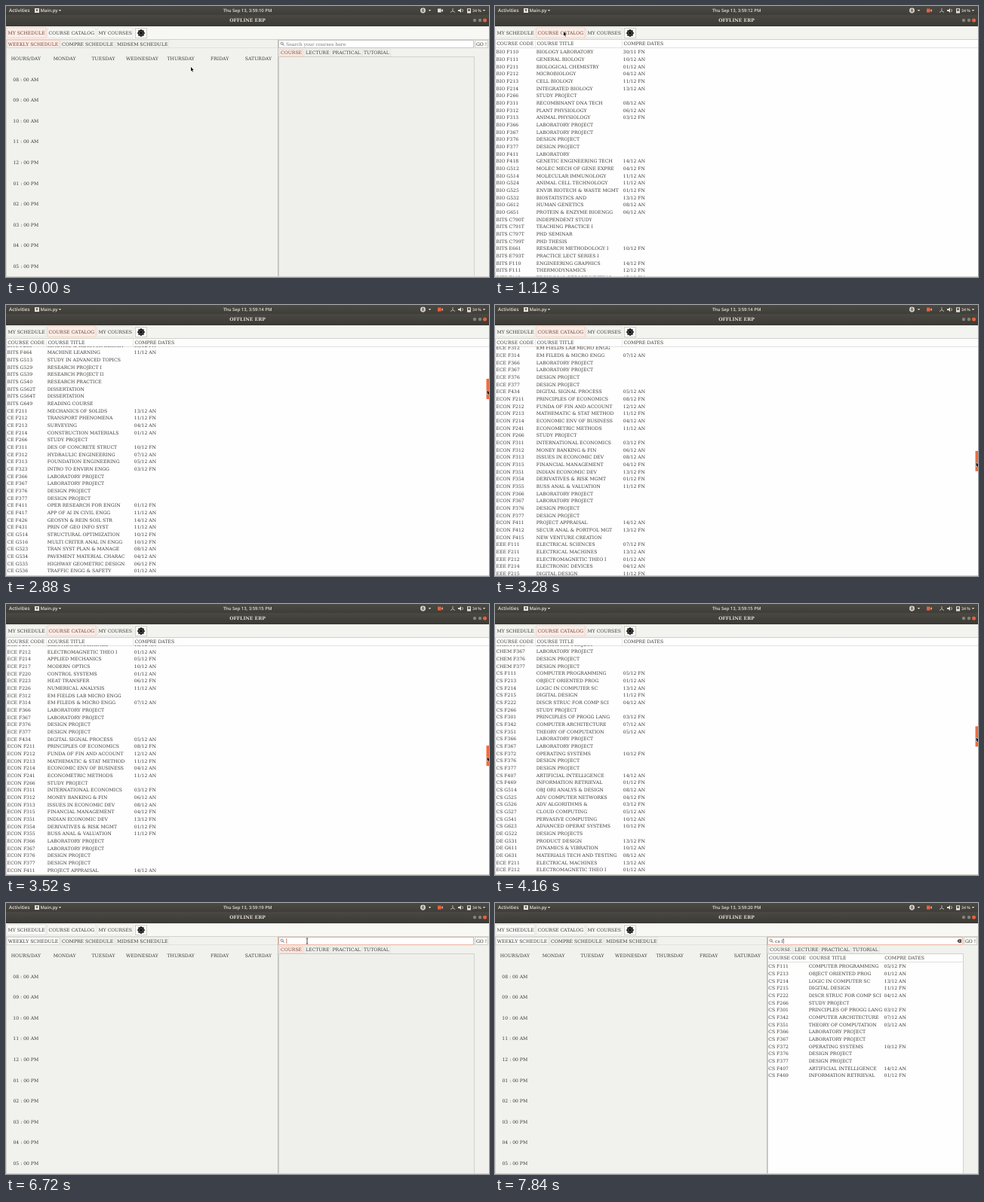
An HTML page with a canvas that plays this animation: 640x360 px, repeating every 8 s.

```html
<!DOCTYPE html>
<html lang="en">
<head>
<meta charset="utf-8">
<title>Offline ERP</title>
<style>
html, body { margin: 0; height: 100%; overflow: hidden; background: #f1f1ed; }
canvas { display: block; width: 100vw; height: 100vh; }
</style>
</head>
<body>
<canvas id="stage" width="640" height="360"></canvas>
<script>
const ctx = document.getElementById('stage').getContext('2d');
ctx.textRendering = 'geometricPrecision';

const LOOP = 8000, STEP = 80, ROW = 29 / 3;
const INK = '#3a3a38', LINE = '#d3d2cc', PAPER = '#f1f1ed', LIGHT = '#f7f7f4', ORANGE = '#ee6c3f';

// Noto Serif runs narrower, so it needs a larger size than DejaVu Serif.
const widthOf = font => { ctx.font = font; return ctx.measureText('Wide iiii').width; };
const hasDejaVu = widthOf('50px "DejaVu Serif", monospace') !== widthOf('50px monospace');
const SIZE = hasDejaVu ? 6.1 : 6.95;
const SERIF = '"DejaVu Serif", "Noto Serif", serif';
const SANS = '"Open Sans", "Noto Sans", sans-serif';

// "NAME:" opens a department, "PROJECTS" adds its four project courses,
// "+count first" adds generated courses.
const CATALOG = `BIO:
F110 BIOLOGY LABORATORY 30/11 FN
F111 GENERAL BIOLOGY 10/12 AN
F211 BIOLOGICAL CHEMISTRY 01/12 AN
F212 MICROBIOLOGY 04/12 AN
F213 CELL BIOLOGY 11/12 FN
F214 INTEGRATED BIOLOGY 13/12 AN
F266 STUDY PROJECT
F311 RECOMBINANT DNA TECH 08/12 AN
F312 PLANT PHYSIOLOGY 06/12 AN
F313 ANIMAL PHYSIOLOGY 03/12 FN
PROJECTS
F411 LABORATORY
F418 GENETIC ENGINEERING TECH 14/12 AN
G512 MOLEC MECH OF GENE EXPRE 04/12 FN
G514 MOLECULAR IMMUNOLOGY 11/12 AN
G524 ANIMAL CELL TECHNOLOGY 11/12 AN
G525 ENVIR BIOTECH & WASTE MGMT 01/12 FN
G532 BIOSTATISTICS AND 13/12 FN
G612 HUMAN GENETICS 08/12 AN
G651 PROTEIN & ENZYME BIOENGG 06/12 AN
BITS:
C790T INDEPENDENT STUDY
C791T TEACHING PRACTICE I
C797T PHD SEMINAR
C799T PHD THESIS
E661 RESEARCH METHODOLOGY I 10/12 FN
E793T PRACTICE LECT SERIES I
F110 ENGINEERING GRAPHICS 14/12 FN
F111 THERMODYNAMICS 12/12 FN
F112 TECHNICAL REPORT WRITING 07/12 FN
+16 213
F464 MACHINE LEARNING 11/12 AN
G513 STUDY IN ADVANCED TOPICS
G529 RESEARCH PROJECT I
G539 RESEARCH PROJECT II
G540 RESEARCH PRACTICE
G562T DISSERTATION
G564T DISSERTATION
G649 READING COURSE
CE:
F211 MECHANICS OF SOLIDS 13/12 AN
F212 TRANSPORT PHENOMENA 11/12 FN
F213 SURVEYING 04/12 AN
F214 CONSTRUCTION MATERIALS 01/12 AN
F266 STUDY PROJECT
F311 DES OF CONCRETE STRUCT 10/12 FN
F312 HYDRAULIC ENGINEERING 07/12 AN
F313 FOUNDATION ENGINEERING 05/12 AN
F323 INTRO TO ENVIRN ENGG 03/12 FN
PROJECTS
F411 OPER RESEARCH FOR ENGIN 01/12 FN
F417 APP OF AI IN CIVIL ENGG 11/12 AN
F426 GEOSYN & REIN SOIL STR 14/12 AN
F431 PRIN OF GEO INFO SYST 11/12 AN
G514 STRUCTURAL OPTIMIZATION 10/12 FN
G516 MULTI CRITER ANAL IN ENGG 10/12 FN
G523 TRAN SYST PLAN & MANAGE 08/12 AN
G534 PAVEMENT MATERIAL CHARAC 04/12 AN
G535 HIGHWAY GEOMETRIC DESIGN 06/12 FN
G536 TRAFFIC ENGG & SAFETY 01/12 AN
CHE:
+24 211
CHEM:
+19 211
F366 LABORATORY PROJECT
F367 LABORATORY PROJECT
F376 DESIGN PROJECT
F377 DESIGN PROJECT
CS:
F111 COMPUTER PROGRAMMING 05/12 FN
F213 OBJECT ORIENTED PROG 01/12 AN
F214 LOGIC IN COMPUTER SC 13/12 AN
F215 DIGITAL DESIGN 11/12 FN
F222 DISCR STRUC FOR COMP SCI 04/12 AN
F266 STUDY PROJECT
F301 PRINCIPLES OF PROGG LANG 03/12 FN
F342 COMPUTER ARCHITECTURE 07/12 AN
F351 THEORY OF COMPUTATION 05/12 AN
F366 LABORATORY PROJECT
F367 LABORATORY PROJECT
F372 OPERATING SYSTEMS 10/12 FN
F376 DESIGN PROJECT
F377 DESIGN PROJECT
F407 ARTIFICIAL INTELLIGENCE 14/12 AN
F469 INFORMATION RETRIEVAL 01/12 FN
G514 OBJ ORI ANALYS & DESIGN 08/12 AN
G525 ADV COMPUTER NETWORKS 04/12 FN
G526 ADV ALGORITHMS & 03/12 FN
G527 CLOUD COMPUTING 05/12 AN
G541 PERVASIVE COMPUTING 10/12 AN
G623 ADVANCED OPERAT SYSTEMS 10/12 FN
DE:
G522 DESIGN PROJECTS
G531 PRODUCT DESIGN 13/12 FN
G611 DYNAMICS & VIBRATION 10/12 AN
G631 MATERIALS TECH AND TESTING 08/12 AN
ECE:
F211 ELECTRICAL MACHINES 13/12 AN
F212 ELECTROMAGNETIC THEO I 01/12 AN
+5 214
F312 EM FIELDS LAB MICRO ENGG
F314 EM FILEDS & MICRO ENGG 07/12 AN
PROJECTS
F434 DIGITAL SIGNAL PROCESS 05/12 AN
ECON:
F211 PRINCIPLES OF ECONOMICS 08/12 FN
F212 FUNDA OF FIN AND ACCOUNT 12/12 AN
F213 MATHEMATIC & STAT METHOD 11/12 FN
F214 ECONOMIC ENV OF BUSINESS 04/12 AN
F241 ECONOMETRIC METHODS 11/12 AN
F266 STUDY PROJECT
F311 INTERNATIONAL ECONOMICS 03/12 FN
F312 MONEY BANKING & FIN 06/12 AN
F313 ISSUES IN ECONOMIC DEV 08/12 AN
F315 FINANCIAL MANAGEMENT 04/12 FN
F351 INDIAN ECONOMIC DEV 13/12 FN
F354 DERIVATIVES & RISK MGMT 01/12 FN
F355 BUSS ANAL & VALUATION 11/12 FN
PROJECTS
F411 PROJECT APPRAISAL 14/12 AN
F412 SECUR ANAL & PORTFOL MGT 13/12 FN
F415 NEW VENTURE CREATION
EEE:
F111 ELECTRICAL SCIENCES 07/12 FN
F211 ELECTRICAL MACHINES 13/12 AN
F212 ELECTROMAGNETIC THEO I 01/12 AN
F214 ELECTRONIC DEVICES 04/12 AN
F215 DIGITAL DESIGN 11/12 FN
+163 241`;
const EXTRA = ['CONTROL SYSTEMS', 'HEAT TRANSFER', 'NUMERICAL ANALYSIS', 'KINETICS & REACTOR DESIGN',
  'STATISTICS', 'PROCESS CONTROL', 'MATERIALS SCIENCE', 'APPLIED MECHANICS', 'MODERN OPTICS'];

const courses = [];
function parseCatalog() {
  let dept = '';
  const add = (num, title, date = '') => courses.push([`${dept} ${num}`, title, date]);
  for (const line of CATALOG.split('\n')) {
    if (line.endsWith(':')) dept = line.slice(0, -1);
    else if (line === 'PROJECTS')
      [366, 367, 376, 377].forEach(n => add('F' + n, n < 370 ? 'LABORATORY PROJECT' : 'DESIGN PROJECT'));
    else if (line[0] === '+') {
      const [count, first] = line.split(' ').map(Number);
      for (let i = 0; i < count; i++) {
        const day = String(1 + (i * 5 + first) % 14).padStart(2, '0');
        add('F' + (first + i * 3), EXTRA[(i + first) % EXTRA.length], `${day}/12 ${i % 3 ? 'AN' : 'FN'}`);
      }
    } else {
      const [, num, title, date] = line.match(/^(\S+) (.+?)(?: (\d\d\/\d\d [AF]N))?$/);
      add(num, title, date);
    }
  }
}
parseCatalog();

// Keys: time, x, y
const POINTER = [[0, 245, 81], [560, 42, 34], [800, 91, 34], [1200, 91, 34], [1440, 151, 34], [1520, 151, 34],
  [2040, 637.5, 70], [2160, 637.5, 88], [2400, 637.5, 72], [2880, 637.5, 113], [3280, 637.5, 209],
  [3440, 637.5, 214], [3680, 637.5, 181], [4080, 637.5, 181], [4160, 637.5, 177], [4400, 637.5, 134],
  [4720, 146, 34], [4960, 146, 34], [5440, 37, 35], [5840, 37, 35], [6160, 300, 58], [6400, 397, 47]];
// Keys: time, offset
const SCROLL = [[2400, 0], [2880, 462], [3280, 1541], [3440, 1600], [3680, 1230], [4080, 1230], [4160, 1187], [4400, 700]];

function track(keys, t) {
  const next = keys.findIndex(k => k[0] > t);
  if (next < 0) return keys.at(-1).slice(1);
  if (next === 0) return keys[0].slice(1);
  const a = keys[next - 1], b = keys[next], p = (t - a[0]) / (b[0] - a[0]);
  return a.slice(1).map((v, i) => v + (b[i + 1] - v) * p);
}

function text(str, x, y, { color = INK, align = 'left', font = `${SIZE}px ${SERIF}` } = {}) {
  ctx.font = font;
  ctx.fillStyle = color;
  ctx.textAlign = align;
  ctx.fillText(str, x, y + 2.3);
}
function rect(x, y, w, h, fill, stroke) {
  if (fill) { ctx.fillStyle = fill; ctx.fillRect(x, y, w, h); }
  if (stroke) { ctx.strokeStyle = stroke; ctx.lineWidth = 1; ctx.strokeRect(x + .5, y + .5, w - 1, h - 1); }
}
function disc(x, y, r, fill) {
  ctx.fillStyle = fill;
  ctx.beginPath();
  ctx.arc(x, y, r, 0, 7);
  ctx.fill();
}
function shape(points, fill, stroke, width = 1) {
  ctx.beginPath();
  points.forEach(([x, y]) => ctx.lineTo(x, y));
  if (fill) { ctx.closePath(); ctx.fillStyle = fill; ctx.fill(); }
  if (stroke) { ctx.strokeStyle = stroke; ctx.lineWidth = width; ctx.stroke(); }
}
const caret = x => shape([[x - 1.7, 5], [x + 1.7, 5], [x, 7]], '#dfdbd2');

function tab(label, x, y, w, h, state) {
  if (state === 'hot') rect(x, y, w, h, '#fbece6', '#f3d3c6');
  else rect(x, y, w, h, state ? '#fafaf8' : null, state ? '#dddcd6' : '#e6e5e0');
  text(label, x + 2, y + h / 2, { color: state === 'hot' ? '#6e4436' : INK });
}

function topBars(t) {
  const shade = ctx.createLinearGradient(0, 0, 0, 27);
  shade.addColorStop(0, '#4b4943');
  shade.addColorStop(.42, '#403e39');
  shade.addColorStop(.46, '#4a4842');
  shade.addColorStop(1, '#3b3934');
  rect(0, 0, 640, 27, shade);
  const pale = '#e6e2da', bar = (size, align) => ({ color: pale, align, font: `600 ${size}px ${SANS}` });
  text('Activities', 4, 5.8, bar(6.3));
  rect(38, 3, 6, 6, pale);
  shape([[39.5, 4.5], [42.5, 4.5], [41, 7.5]], '#45433d');
  text('Main.py', 45.5, 5.8, bar(6));
  caret(71.5);
  text(`Thu Sep 13, 3:59:${10 + Math.floor((t + 480) / 800)} PM`, 320, 5.8, bar(5.9, 'center'));

  disc(552.5, 6, 3.4, pale);
  disc(552.5, 4.4, .8, '#45433d');
  shape([[550.5, 5.8], [554.5, 5.8]], null, '#45433d', .8);
  shape([[551.2, 8.4], [552.5, 6], [553.8, 8.4]], null, '#45433d', .8);
  caret(561.5);
  const recording = t >= 400;
  rect(572, 3.5, 4.6, 5, recording ? '#e8603f' : pale);
  shape([[576.5, 6], [579, 4], [579, 8]], recording ? '#e0a090' : pale);
  shape([[592, 3], [592, 7]], null, '#b9b5ac', 1);
  shape([[589, 8.5], [592, 6.5], [595, 8.5]], null, '#b9b5ac', 1);
  shape([[599, 5], [601, 5], [603, 3], [603, 9], [601, 7], [599, 7]], pale);
  shape([[604.5, 4], [605.5, 6], [604.5, 8]], null, pale, .8);
  rect(611, 3.2, 5, 6.3, pale);
  rect(612, 4.2, 3, 2.5, '#55524b');
  text('34 %', 618, 6, bar(5.2));
  caret(633.5);

  text('OFFLINE ERP', 320, 19, { color: '#dfdbd2', align: 'center', font: `bold ${SIZE}px ${SERIF}` });
  disc(621, 19, 2.2, '#85827a');
  disc(628, 19, 2.2, '#85827a');
  disc(634.5, 19, 2.5, '#e8603c');
}

function gear(x, y) {
  rect(x - 8, y - 7, 16, 14, '#fbfbf9', '#cfcec8');
  for (let i = 0; i < 8; i++) {
    const c = Math.cos(i * Math.PI / 4), s = Math.sin(i * Math.PI / 4);
    shape([[x + c, y + s], [x + c * 5, y + s * 5]], null, '#111', 1.3);
  }
  ctx.beginPath();
  ctx.arc(x, y, 3.5, 0, 7);
  ctx.stroke();
  disc(x, y, 1.5, '#111');
}

function mainTabs(view, t) {
  rect(0, 27, 640, 18, view === 'schedule' ? LIGHT : '#f3f3ef');
  rect(0, 44, 640, 1, LINE);
  const state = name => view === name && (name === 'schedule' && t >= 6000 ? 'on' : 'hot');
  tab('MY SCHEDULE', .5, 28, 53, 15, state('schedule'));
  tab('COURSE CATALOG', 54.5, 28, 65, 15, state('catalog'));
  tab('MY COURSES', 120.5, 28, 48, 15, state('courses'));
  gear(179, 36);
}

function courseTable(rows, [codeX, titleX, dateX], top, firstY, offset) {
  ['COURSE CODE', 'COURSE TITLE', 'COMPRE DATES'].forEach((label, i) =>
    text(label, [codeX, titleX, dateX][i] + .7, top - 5));
  ctx.save();
  ctx.beginPath();
  ctx.rect(0, top, 640, 359 - top);
  ctx.clip();
  rows.forEach(([code, title, date], i) => {
    const y = firstY + i * ROW - offset;
    if (y < top - 6 || y > 366) return;
    text(code, codeX, y);
    text(title, titleX, y);
    text(date, dateX, y);
  });
  ctx.restore();
}

function catalogView(t) {
  const [offset] = track(SCROLL, t);
  rect(0, 45, 640, 315, '#fefefe');
  rect(0, 55, 640, 1, '#e2e1dc');
  for (const x of [53, 168]) rect(x, 46, 1, 9, '#e8e7e3');
  courseTable(courses, [1.5, 54.7, 169.8], 55, 61, offset);
  rect(0, 45, 1, 315, LINE);
  rect(0, 359, 640, 1, LINE);
  if (t >= 1600) {
    const w = t >= 2400 && t < 4560 ? 3.5 : 2;
    rect(640 - w, 57 + offset * .0888, w, 27, ORANGE);
  }
}

function coursesView() {
  rect(0, 45, 640, 315, PAPER, LINE);
  text('DOUBLE CLICK ON THE COURSE YOU WANT TO DELETE', 320, 48.5, { align: 'center' });
}

const since = (t, steps) => steps.reduce((value, [at, v]) => t >= at ? v : value, '');

function searchBox(t) {
  const focused = t >= 6560;
  const typed = since(t, [[7200, 'c'], [7360, 'cs'], [7680, 'cs '], [7840, 'cs f']]);
  rect(361, 45, 259, 11, '#fff', focused ? '#eeb29b' : '#c9c8c2');
  ctx.beginPath();
  ctx.arc(365.6, 49.7, 1.6, 0, 7);
  ctx.strokeStyle = '#666';
  ctx.lineWidth = .8;
  ctx.stroke();
  shape([[366.7, 50.8], [368.4, 52.5]], null, '#666', 1);
  if (!focused) text('Search your courses here', 371, 50.3, { color: '#777' });
  else {
    text(typed, 371, 50.3);
    rect(371.5 + ctx.measureText(typed).width, 47, .7, 7, '#a5503a');
  }
  if (t >= 7360) {
    shape([[612.5, 50.5], [614.3, 48.2], [618, 48.2], [618, 52.8], [614.3, 52.8]], '#333');
    shape([[614.5, 49.4], [616.7, 51.6]], null, '#fff', .7);
    shape([[614.5, 51.6], [616.7, 49.4]], null, '#fff', .7);
  }
  rect(621, 45, 18, 11, '#f8f8f5', '#cfcec8');
  text('GO !', 623, 50.3);
}

function scheduleView(t) {
  rect(0, 45, 640, 315, PAPER);
  tab('WEEKLY SCHEDULE', .8, 45, 70.5, 11, t < 6560 ? 'hot' : 'on');
  tab('COMPRE SCHEDULE', 72, 45, 72, 11);
  tab('MIDSEM SCHEDULE', 145, 45, 71, 11);
  rect(0, 55.5, 360, .5, LINE);
  ['HOURS/DAY', 'MONDAY', 'TUESDAY', 'WEDNESDAY', 'THURSDAY', 'FRIDAY', 'SATURDAY'].forEach((day, i) =>
    text(day, 26.3 + i * 51.35, 70, { align: 'center' }));
  for (let i = 0; i < 10; i++) {
    const hour = String((i + 7) % 12 + 1).padStart(2, '0');
    text(`${hour} : 00 ${i < 4 ? 'AM' : 'PM'}`, 26.3, 97.5 + i * 27.55, { align: 'center' });
  }
  rect(0, 45, 1, 315, LINE);
  rect(360, 45, 1, 315, '#bdbcb6');
  rect(0, 359, 640, 1, LINE);

  searchBox(t);
  tab('COURSE', 362, 57, 32, 10, t < 7520 ? 'hot' : 'on');
  tab('LECTURE', 395, 57, 35, 10);
  tab('PRACTICAL', 430.5, 57, 41, 10);
  tab('TUTORIAL', 472, 57, 38, 10);

  const query = since(t, [[7520, 'c'], [7680, 'cs'], [7840, 'cs f']]);
  rect(361, 67, 260, 293, query ? '#fefefe' : '#efefeb', LINE);
  if (query) {
    rect(362, 78, 258, 1, '#e2e1dc');
    const found = courses.filter(([code, title]) => `${code} ${title}`.toLowerCase().includes(query));
    courseTable(found, [362.3, 415.7, query === 'cs f' ? 515.5 : 528], 78, 84, 0);
  }
}

function pointer(t) {
  if (t >= 7200) return;
  const [x, y] = track(POINTER, t);
  if (t >= 6400) {
    shape([[x + 2, y], [x + 2, y + 7]], null, '#222', .8);
    shape([[x + .8, y], [x + 3.2, y]], null, '#222', .8);
    shape([[x + .8, y + 7], [x + 3.2, y + 7]], null, '#222', .8);
    return;
  }
  const arrow = [[0, 0], [0, 5.5], [1.2, 4.4], [2.1, 6.6], [3, 6.2], [2.1, 4.1], [3.8, 4], [0, 0]];
  const outline = arrow.map(([dx, dy]) => [x + dx, y + dy]);
  shape(outline, null, '#fff', 1);
  shape(outline, '#111');
}

function draw(t) {
  const view = t < 1120 || t >= 5600 ? 'schedule' : t < 4800 ? 'catalog' : 'courses';
  topBars(t);
  mainTabs(view, t);
  ({ schedule: scheduleView, catalog: catalogView, courses: coursesView })[view](t);
  pointer(t);
}

const start = performance.now();
function tick() {
  const t = (performance.now() - start) % LOOP;
  draw(Math.floor(t / STEP) * STEP);
  requestAnimationFrame(tick);
}
tick();
</script>
</body>
</html>
```
